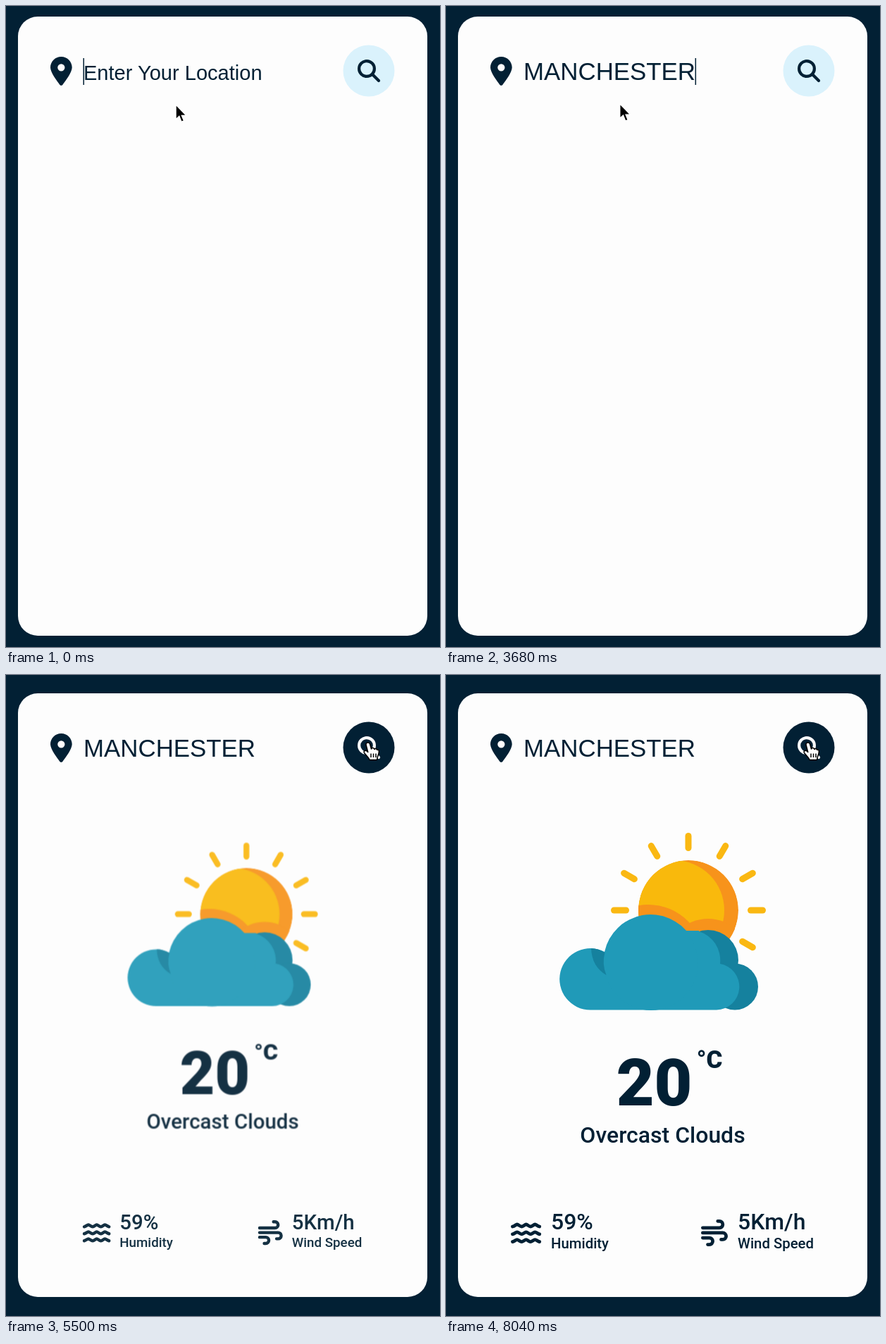
Recreate the animation shown at these times as an HTML page. Size 616 by 910 pixels, loop 8060 ms.

```html
<!DOCTYPE html>
<html lang="en">
<head>
<meta charset="utf-8">
<title>Weather search</title>
<style>
  html, body { margin: 0; width: 100%; height: 100%; overflow: hidden; background: #022034; }
  svg { display: block; width: 616px; height: 910px; }
  .field { font-family: "Liberation Sans", Arial, sans-serif; }
  .result { font-family: Roboto, sans-serif; font-weight: 500; }
  .line { fill: none; stroke-linecap: round; stroke-linejoin: round; }
</style>
</head>
<body>
<svg viewBox="0 0 616 910" fill="#022034">
  <defs>
    <clipPath id="sunClip"><circle cx="344" cy="334" r="71"/></clipPath>
    <clipPath id="sunLight"><circle cx="324" cy="334" r="71"/></clipPath>
    <path id="wave" class="line" stroke="#022034" stroke-width="4.8"
      d="M94.5 783c3.2-.6 4.4-3 6.4-3s4 3 6.6 3 4.2-3 6.2-3 3.8 3 6.4 3 4.2-3 6.2-3 3.4 2.4 6.4 3"/>
  </defs>
  <rect id="card" x="17" y="15" width="581" height="879" rx="28" fill="#fdfdfd"/>

  <g id="bar">
    <path transform="translate(63 72) scale(.08)" fill-rule="evenodd"
      d="M216 499C267 435 384 279 384 192C384 86 298 0 192 0S0 86 0 192c0 87 117 243 168 307c12 15 36 15 48 0zM192 128a64 64 0 1 1 0 128a64 64 0 1 1 0-128z"/>
    <text id="entry" class="field" x="110" y="105"></text>
    <rect id="caret" y="74" width="1.5" height="38"/>
    <circle id="button" cx="515" cy="92" r="36.5"/>
    <g id="lens" class="line" stroke-width="4.2">
      <circle cx="512" cy="89" r="10.9"/>
      <path d="M520 97l9 9"/>
    </g>
  </g>

  <g id="weather" class="result">
    <g id="rays" class="line" stroke="#fab812" stroke-width="9"></g>
    <g clip-path="url(#sunClip)">
      <circle cx="344" cy="334" r="71" fill="#f7931b"/>
      <circle cx="344" cy="334" r="71" fill="#f9b90c" clip-path="url(#sunLight)"/>
      <g fill="#f7931b">
        <circle cx="287" cy="406" r="80"/>
        <circle cx="372" cy="406" r="60"/>
      </g>
    </g>
    <g fill="#15819e">
      <circle cx="372" cy="405" r="43"/>
      <circle cx="410" cy="442.5" r="33"/>
    </g>
    <g fill="#209ab8">
      <path d="M291 363H359V364A43 43 0 0 1 389 410A33 33 0 0 1 384 475.5H205A43.7 43.7 0 1 1 225 393A67 67 0 0 1 347 371Q353 366 359 364V420H291z"/>
      <circle cx="291" cy="409" r="67"/>
    </g>
    <path fill="#15819e" d="M206 388Q207 414 227.500 426Q221 410 225.500 394Q216 388 206 388z"/>
    <text x="295.500" y="611" font-size="92.960" font-weight="900" text-anchor="middle">20</text>
    <text x="392.500" y="558" font-size="34.860" font-weight="900" text-anchor="end">°C</text>
    <text x="307.500" y="664" font-size="31.950" text-anchor="middle">Overcast Clouds</text>
  </g>

  <g id="details" class="result">
    <use href="#wave"/><use href="#wave" y="10.800"/><use href="#wave" y="21.600"/>
    <path class="line" transform="translate(362 773) scale(.0742)" stroke="#022034" stroke-width="64"
      d="M320 32H352a64 64 0 0 1 0 128H32M32 256H416a64 64 0 0 1 0 128H384M32 352H160a64 64 0 0 1 0 128H128"/>
    <g font-size="31.950"><text x="149" y="787">59%</text><text x="414" y="787">5Km/h</text></g>
    <g font-size="20.340"><text x="149" y="814">Humidity</text><text x="414" y="814">Wind Speed</text></g>
  </g>

  <path id="arrow" fill="#000" stroke="#fff" stroke-width="1.500"
    d="M0 0V21L4.800 16.600L8 24.500L11.600 23L8.500 15.500H15z"/>
  <g id="hand" stroke="#000" stroke-width="1.500" stroke-linejoin="round">
    <path fill="#fff" d="M-3 2C-3.500-1.500 1.500-2 2.500 1L4.500 8C5 6 8.500 6 9 8.500C10 7 12.500 7.500 12.800 9.500C14 8.700 15.500 9.500 15.300 12C15.300 16 13 18 12.500 23.500H2C1 20-3 17-5.500 13.500C-7 11-4 9.500-2 11L-.300 12.500z"/>
    <path d="M4 14.500V20M7.500 14.500V20M11 14.500V20"/>
  </g>
</svg>
<script>
const LOOP = 8060, WORD = "MANCHESTER", TYPE_AT = 1500, KEY_GAP = 206;
const CLICK = 4500, HOVER = 4050, FOUND = 4670;
const $ = id => document.getElementById(id);
const set = (id, attrs) => { for (const k in attrs) $(id).setAttribute(k, attrs[k]); };
const clamp = x => Math.min(1, Math.max(0, x));
const mix = (a, b, p) => a + (b - a) * p;
const mixColor = (a, b, p) => `rgb(${a.map((v, i) => Math.round(mix(v, b[i], p)))})`;

// CSS-style cubic-bezier timing
function bezier(x1, y1, x2, y2) {
  const at = (a, b, u) => 3 * (1 - u) * (1 - u) * u * a + 3 * (1 - u) * u * u * b + u ** 3;
  return x => {
    x = clamp(x);
    if (x === 0 || x === 1) return x;
    let lo = 0, hi = 1;
    for (let i = 0; i < 24; i++) {
      const mid = (lo + hi) / 2;
      if (at(x1, x2, mid) < x) lo = mid; else hi = mid;
    }
    return at(y1, y2, lo);
  };
}
const ease = bezier(.25, .1, .25, 1), easeOut = bezier(0, 0, .58, 1), easeInOut = bezier(.42, 0, .58, 1);

// time, x, y of the pointer tip
const pointerPath = [[0, 241, 140], [3620, 241, 140], [4200, 502, 79], [4330, 502, 79],
  [4550, 508, 85], [5000, 508, 85], [5400, 514, 97], [LOOP, 514, 97]];

function pointerAt(t) {
  const i = pointerPath.findIndex(p => p[0] > t);
  const a = pointerPath[i - 1], b = pointerPath[i];
  const p = easeInOut((t - a[0]) / (b[0] - a[0]));
  return [mix(a[1], b[1], p), mix(a[2], b[2], p)];
}

for (let deg = -180; deg <= 30; deg += 30) {
  const ray = document.createElementNS("http://www.w3.org/2000/svg", "path");
  ray.setAttribute("d", "M88.500 0H105.500");
  ray.setAttribute("transform", `translate(344 334) rotate(${deg})`);
  $("rays").append(ray);
}

function drawEntry(t) {
  const count = t < TYPE_AT ? 0 : Math.min(WORD.length, 1 + Math.floor((t - TYPE_AT) / KEY_GAP));
  const typed = WORD.slice(0, count);
  $("entry").textContent = typed || "Enter Your Location";
  set("entry", { "font-size": count ? 34.86 : 29.05 });
  const lastKey = count ? TYPE_AT + (count - 1) * KEY_GAP : 0;
  const caretOn = t < CLICK && (t - lastKey) % 1000 < 500;
  set("caret", {
    x: 109.5 + (count ? $("entry").getComputedTextLength() : 0),
    visibility: caretOn ? "visible" : "hidden"
  });
}

function drawPointer(t) {
  const [x, y] = pointerAt(t), transform = `translate(${x} ${y})`;
  const away = t >= TYPE_AT && t < 3620, over = t >= HOVER;
  set("arrow", { transform, visibility: away || over ? "hidden" : "visible" });
  set("hand", { transform, visibility: over ? "visible" : "hidden" });
}

function popIn(id, p, cy) {
  set(id, { opacity: p, transform: `translate(307.5 ${cy}) scale(${p}) translate(-307.5 ${-cy})` });
}

function draw(t) {
  const hover = ease((t - HOVER) / 400);
  set("button", { fill: mixColor([218, 242, 252], [2, 32, 52], hover) });
  set("lens", { stroke: mixColor([2, 32, 52], [253, 253, 253], hover) });

  const shift = 11 * easeOut((t - FOUND) / 600);
  set("card", { y: 15 + shift, height: 879 - 2 * shift });
  set("bar", { transform: `translate(0 ${shift})` });

  const shown = ease((t - FOUND - 500) / 500);
  popIn("weather", shown, 405);
  popIn("details", shown, 787);
  drawEntry(t);
  drawPointer(t);
}

const start = performance.now();
function tick() {
  draw((performance.now() - start) % LOOP);
  requestAnimationFrame(tick);
}
tick();
</script>
</body>
</html>
```
